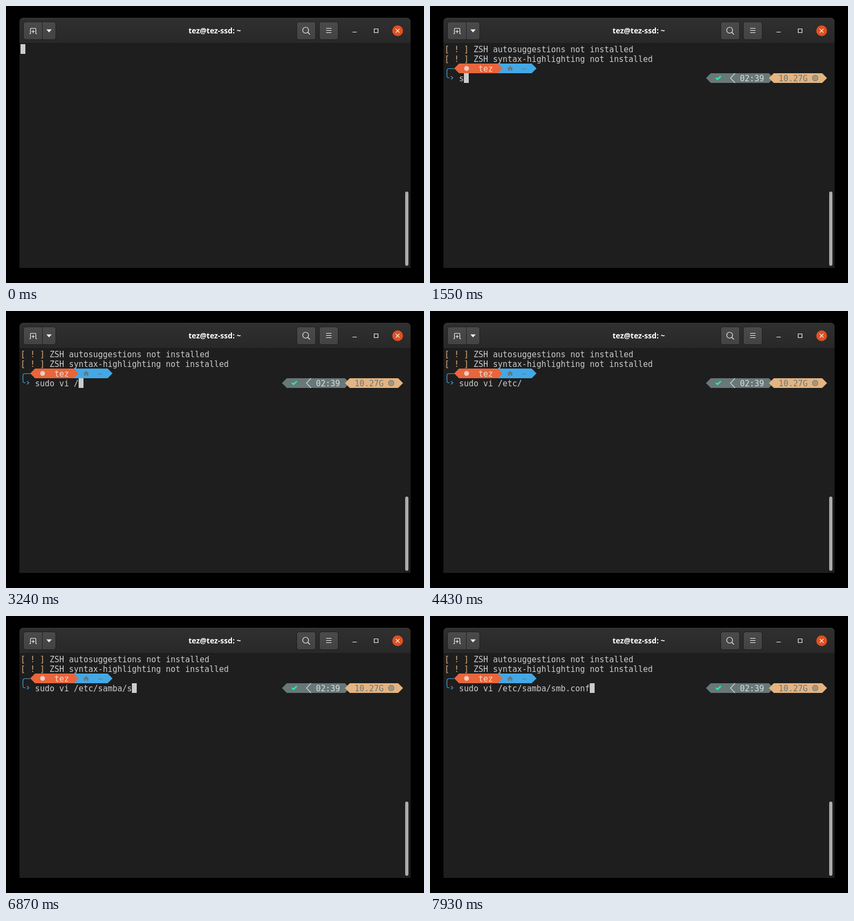
These frames come from a looping animation (777 by 515 pixels, 8000 ms). An HTML page:

```html
<!DOCTYPE html>
<html lang="en">
<head>
<meta charset="utf-8">
<title>Terminal</title>
<style>
  html, body { margin: 0; width: 100%; height: 100%; overflow: hidden; background: #000; }
  svg { display: block; }
  text { white-space: pre; font: 15px "DejaVu Sans Mono", monospace; }
  .title { font: bold 14px "Noto Sans", sans-serif; text-anchor: middle; fill: #fff; }
  .button { fill: url(#raised); stroke: #1d1d1d; }
  .icon { fill: none; stroke: #f2f2f2; stroke-width: 1.2; }
</style>
</head>
<body>
<svg width="777" height="515" viewBox="0 0 777 515">
  <defs>
    <linearGradient id="bar" x2="0" y2="1"><stop stop-color="#303030"/><stop offset="1" stop-color="#282828"/></linearGradient>
    <linearGradient id="raised" x2="0" y2="1"><stop stop-color="#4a4a4a"/><stop offset="1" stop-color="#434343"/></linearGradient>
  </defs>

  <!-- Window frame -->
  <path d="M25 487V30q0-8 8-8H744q8 0 8 8V487Z" fill="#1e1e1e"/>
  <path d="M25 69V30q0-8 8-8H744q8 0 8 8V69Z" fill="url(#bar)"/>
  <path d="M27 26q2-3.500 6-3.500H744q4 0 6 3.500" fill="none" stroke="#3c3c3c"/>
  <path d="M25 69.500H752" stroke="#191919"/>
  <text class="title" x="388" y="51">tez@tez-ssd: ~</text>

  <!-- Header buttons -->
  <rect class="button" x="32.500" y="29.500" width="60" height="33" rx="4"/>
  <path d="M67.500 30V62" stroke="#222"/>
  <rect class="button" x="540.500" y="29.500" width="35" height="33" rx="4"/>
  <rect class="button" x="582.500" y="29.500" width="35" height="33" rx="4"/>
  <path class="icon" d="M43.500 51.500h2v-9q0-1 1-1h8q1 0 1 1v9h2M47.500 47.500h6m-3-3v6"/>
  <path d="M75 43.500h10l-5 5.500Z" fill="#f2f2f2"/>
  <g class="icon"><circle cx="557" cy="45" r="5.500"/><path d="M561 49l4 4"/></g>
  <path class="icon" d="M595 41.500h10m-10 4h10m-10 4h10"/>
  <path class="icon" d="M644 48.500h8M684.500 42.500h7v7h-7z"/>
  <circle cx="728" cy="46" r="10" fill="#e05020"/>
  <path class="icon" d="M724.500 42.500l7 7m0-7l-7 7"/>
  <rect x="742" y="345" width="6" height="138" rx="3" fill="#acacac"/>

  <g id="notices"></g>

  <g id="prompt">
    <path d="M45 116.500H35q-3.500 0-3.500 3.500V130q0 3.500 3.500 3.500h1.500M39 130.500l3.500 3-3.500 3" fill="none" stroke="#43a9e6" stroke-width="1.200"/>
    <path d="M126 107H189l9 9-9 9H126Z" fill="#43a9e6"/>
    <path d="M45 116l9-9h72l9 9-9 9H54Z" fill="#e9653b"/>
    <circle cx="68" cy="116" r="4.500" fill="#e6cfc4"/>
    <path d="M143.500 116.500l5.500-5 5.500 5h-1.500v4h-3v-3h-2v3h-3v-4Z" fill="#6b7476"/>
  </g>

  <g id="status">
    <path d="M513 134l9-9H630l9 9-9 9H522Z" fill="#687878"/>
    <path d="M531.500 133.500l3 3 6-6" fill="none" stroke="#2fe8a5" stroke-width="2.500"/>
    <path d="M567 125l-8.500 9 8.500 9" fill="none" stroke="#d5dcdc" stroke-width="1.200"/>
  </g>

  <g id="memory">
    <path d="M630 134l9-9h90l9 9-9 9h-90Z" fill="#e4b482"/>
    <g fill="none" stroke="#687878">
      <rect x="712" y="130" width="8" height="8" rx="2" stroke-width="1.500"/>
      <rect x="714.500" y="132.500" width="3" height="3"/>
      <path d="M714.500 128v2m3-2v2m-3 8v2m3-2v2M710 132.500h2m-2 3h2m8-3h2m-2 3h2"/>
    </g>
  </g>

  <g id="input"></g>
  <rect id="cursor" width="9" height="18" fill="#ccc"/>
</svg>
<script>
const LOOP = 8000, CELL_W = 9, CELL_H = 18, LEFT = 27, TOP = 71;
const command = "sudo vi /etc/samba/smb.conf";
const keyTimes = [
  1550, 1710, 1810, 1910, 2010, 2780, 2880, 2980, 3240,
  3380, 3430, 3690, 4430, 4730, 5210, 5500, 5690, 5770, 6230,
  6870, 7080, 7260, 7430, 7610, 7720, 7820, 7930
];
const byId = id => document.getElementById(id);
const [notices, prompt_, status_, memory, input, cursor] =
  ["notices", "prompt", "status", "memory", "input", "cursor"].map(byId);

// Places text on the terminal's character grid.
function print(parent, col, row, string, color) {
  const text = document.createElementNS("http://www.w3.org/2000/svg", "text");
  text.setAttribute("x", [...string].map((_, i) => LEFT + (col + i) * CELL_W).join(" "));
  text.setAttribute("y", TOP + row * CELL_H + 15);
  text.setAttribute("fill", color);
  text.textContent = string;
  parent.append(text);
  return text;
}

["autosuggestions", "syntax-highlighting"].forEach((plugin, row) => {
  print(notices, 0, row, "[ ! ]", "#d9ad7c");
  print(notices, 6, row, `ZSH ${plugin} not installed`, "#ccc");
});
print(prompt_, 7, 2, "tez", "#f0dcd4");
print(prompt_, 16, 2, "~", "#6b7476");
print(status_, 61, 3, "02:39", "#d5dcdc");
print(memory, 69, 3, "10.27G", "#687878");
const typed = print(input, 3, 3, command, "#ccc");

function show(node, visible) {
  node.style.display = visible ? "" : "none";
}

function moveCursor(col, row) {
  cursor.setAttribute("x", LEFT + col * CELL_W);
  cursor.setAttribute("y", TOP + row * CELL_H);
}

function draw(t) {
  const count = keyTimes.filter(time => time <= t).length;
  typed.textContent = command.slice(0, count);
  show(notices, t >= 100);
  show(prompt_, t >= 170);
  show(status_, t >= 170);
  show(memory, t >= 270);
  status_.setAttribute("transform", `translate(${t < 270 ? 11 * CELL_W : 0})`);

  // The cursor stays dark through the middle of the typing.
  show(cursor, t < 170 || (t >= 270 && t < 3380) || t >= 6870);
  if (t < 170) moveCursor(0, t < 100 ? 0 : 2);
  else moveCursor(3 + count, 3);
}

const start = performance.now();
function frame() {
  draw((performance.now() - start) % LOOP);
  requestAnimationFrame(frame);
}
frame();
</script>
</body>
</html>
```
